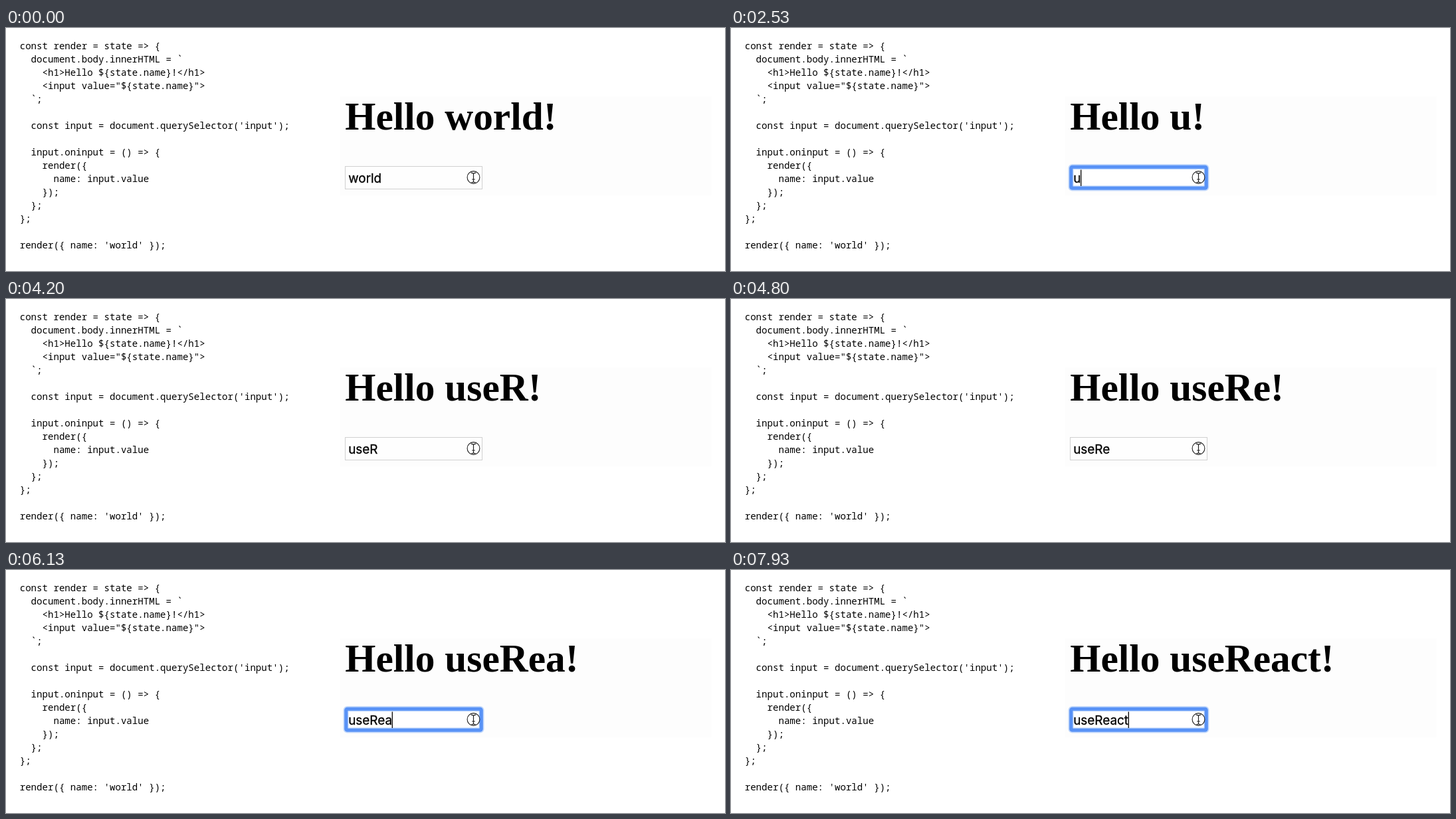
An HTML page for the animation above (8 s loop, 1082 by 366 pixels).

```html
<!DOCTYPE html>
<html lang="en">
<head>
<meta charset="utf-8">
<title>Re-rendering input</title>
<style>
  html, body { margin: 0; width: 100%; height: 100%; overflow: hidden; background: #fff; }
  svg { display: block; width: 1082px; height: 366px; }
  text { white-space: pre; fill: #000; }
  #code { font: 14.1px "Noto Sans Mono", "DejaVu Sans Mono", monospace; font-variant-ligatures: none; }
  #title { font: bold 59.4px "Liberation Serif", Times, serif; }
  #value { font: 18.9px Inter, "Liberation Sans", sans-serif; stroke: #000; stroke-width: .3; }
</style>
</head>
<body>
<svg viewBox="0 0 1082 366">
  <g id="code"></g>
  <rect x="503" y="103" width="559" height="149" fill="#fdfdfd"/>
  <text id="title" x="510.2" y="153"></text>

  <rect id="border" x="510.5" y="208.5" width="206" height="34" fill="#fefefe" stroke="#d0d0d0"/>
  <g id="ring">
    <rect x="507.5" y="205" width="212" height="40.5" rx="6" fill="#c3d9fb"/>
    <rect x="509.2" y="206.7" width="208.6" height="37.1" rx="4.5" fill="#5892f6"/>
    <rect x="514.2" y="211.8" width="198.6" height="26.9" rx="1" fill="#b4cffa"/>
    <rect x="515.4" y="213" width="196.2" height="24.5" fill="#fff"/>
  </g>
  <rect id="selection" x="515" y="213" height="25" fill="#a8cbfa"/>
  <text id="value" x="515.2" y="233"></text>
  <rect id="caret" y="213.5" width="1.4" height="24.5" fill="#111"/>

  <g fill="none" stroke="#222">
    <circle cx="703.5" cy="225" r="9.4" fill="#fff" fill-opacity=".6" stroke-width="1.1"/>
    <path d="M699.8 218.2q3.7 0 3.7 2.2q0-2.2 3.7-2.2M703.5 219.5v12M699.8 233q3.7 0 3.7-2.2q0 2.2 3.7 2.2M701.2 228h4.6" stroke-width="1.2"/>
  </g>
</svg>
<script>
const LOOP = 8000;
const $ = id => document.getElementById(id);

const source = [
  "const render = state => {",
  "  document.body.innerHTML = `",
  "    <h1>Hello ${state.name}!</h1>",
  "    <input value=\"${state.name}\">",
  "  `;",
  "",
  "  const input = document.querySelector('input');",
  "",
  "  input.oninput = () => {",
  "    render({",
  "      name: input.value",
  "    });",
  "  };",
  "};",
  "",
  "render({ name: 'world' });"
];

// Each step: start time, name, field state.
const steps = [
  [0, "world", "idle"],
  [530, "world", "caret"],
  [1000, "world", "focus"],
  [1070, "world", "selected"],
  [1930, "u", "idle"],
  [2530, "u", "caret"],
  [2870, "us", "idle"],
  [3130, "us", "caret"],
  [3600, "us", "focus"],
  [3670, "use", "idle"],
  [3930, "use", "caret"],
  [4200, "useR", "idle"],
  [4470, "useR", "caret"],
  [4800, "useRe", "idle"],
  [5130, "useRe", "caret"],
  [5600, "useRe", "focus"],
  [5670, "useRea", "idle"],
  [6070, "useRea", "caret"],
  [6400, "useReac", "idle"],
  [6670, "useReac", "caret"],
  [7130, "useReac", "focus"],
  [7270, "useReact", "idle"],
  [7730, "useReact", "caret"]
];

function drawCode() {
  source.forEach((line, i) => {
    const row = document.createElementNS("http://www.w3.org/2000/svg", "text");
    row.setAttribute("x", 20.7);
    row.setAttribute("y", 32 + 20 * i);
    row.textContent = line;
    $("code").append(row);
  });
}

const show = (id, on) => { $(id).style.display = on ? "" : "none"; };

function render([, name, state]) {
  $("title").textContent = `Hello ${name}!`;
  $("value").textContent = name;
  const width = $("value").getComputedTextLength();
  $("caret").setAttribute("x", 514.8 + width);
  $("selection").setAttribute("width", width);
  show("border", state === "idle");
  show("ring", state !== "idle");
  show("caret", state === "caret");
  show("selection", state === "selected");
}

let current;
function tick() {
  const time = performance.now() % LOOP;
  const step = steps.findLast(([start]) => start <= time);
  if (step !== current) render(current = step);
  requestAnimationFrame(tick);
}

drawCode();
tick();
</script>
</body>
</html>
```
